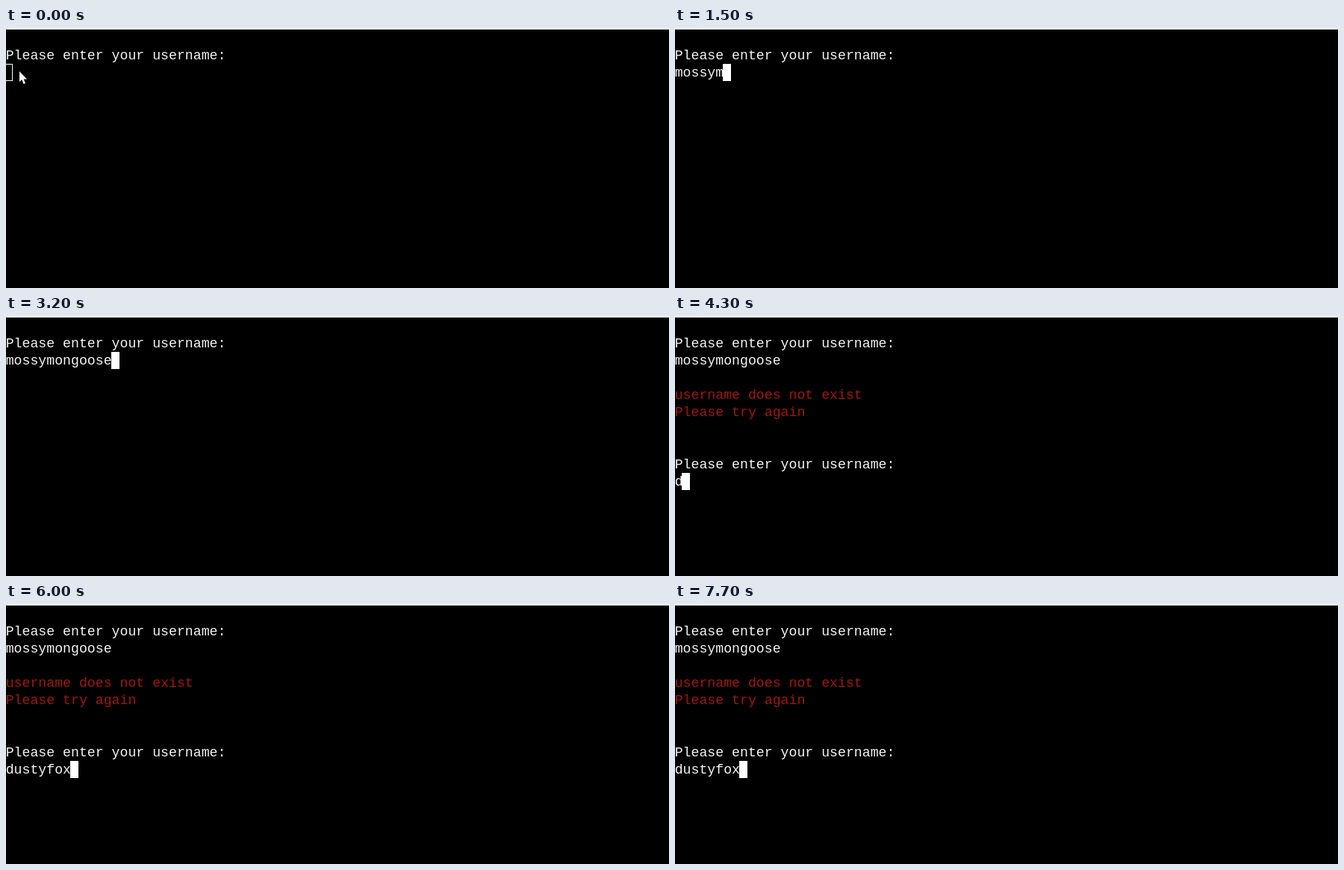
These frames come from a looping animation (888 by 348 pixels, 7800 ms). An HTML page:

```html
<!DOCTYPE html>
<html lang="en">
<head>
<meta charset="utf-8">
<title>Username prompt</title>
<style>
  html, body { margin: 0; width: 100%; height: 100%; overflow: hidden; background: #000; }
  svg { display: block; width: 888px; height: 348px; }
  text { font: 18.21px "Liberation Mono", monospace; fill: #f4f4f4; }
  .error text { fill: #9c1a12; }
  #reply, #pointer, #hollow, #block { visibility: hidden; }
</style>
</head>
<body>
<svg viewBox="0 0 888 348">
  <rect width="888" height="348"/>
  <rect width="888" height="2" fill="#fff"/>
  <g transform="translate(-0.3 0)">
    <text y="42">Please enter your username:</text>
    <text y="65" id="first"></text>
    <g id="reply">
      <g class="error">
        <text y="111">username does not exist</text>
        <text y="134">Please try again</text>
      </g>
      <text y="203.5">Please enter your username:</text>
      <text y="226.5" id="second"></text>
    </g>
  </g>
  <rect id="hollow" x="-1.5" y="48.5" width="10" height="22" fill="none" stroke="#fff"/>
  <rect id="block" width="11" height="23" fill="#fff"/>
  <path id="pointer" d="M18 58V72L21.3 69L23.6 75L26 74L23.6 68.4H28Z" fill="#fff"/>
</svg>
<script>
  const LOOP = 7800, FOCUS = 100, REPLY = 3600, CELL = 10.93;
  const $ = id => document.getElementById(id);
  const first = {
    line: $("first"), name: "mossymongoose", top: 48,
    keys: [200, 600, 700, 900, 1100, 1500, 1700, 2000, 2100, 2400, 2600, 2700, 3200]
  };
  const second = {
    line: $("second"), name: "dustyfox", top: 210,
    keys: [4300, 4500, 4600, 4900, 5100, 5400, 5600, 6000]
  };
  const typed = (entry, t) => entry.keys.filter(k => k <= t).length;
  const show = (id, on) => { $(id).style.visibility = on ? "visible" : "hidden"; };

  function draw(t) {
    for (const entry of [first, second])
      entry.line.textContent = entry.name.slice(0, typed(entry, t));

    const active = t < REPLY ? first : second;
    $("block").setAttribute("x", Math.floor(typed(active, t) * CELL - 1));
    $("block").setAttribute("y", active.top);

    show("hollow", t < FOCUS);
    show("block", t >= FOCUS);
    show("pointer", t < first.keys[0]);
    show("reply", t >= REPLY);
  }

  const start = performance.now();
  function tick() {
    draw((performance.now() - start) % LOOP);
    requestAnimationFrame(tick);
  }
  tick();
</script>
</body>
</html>
```
